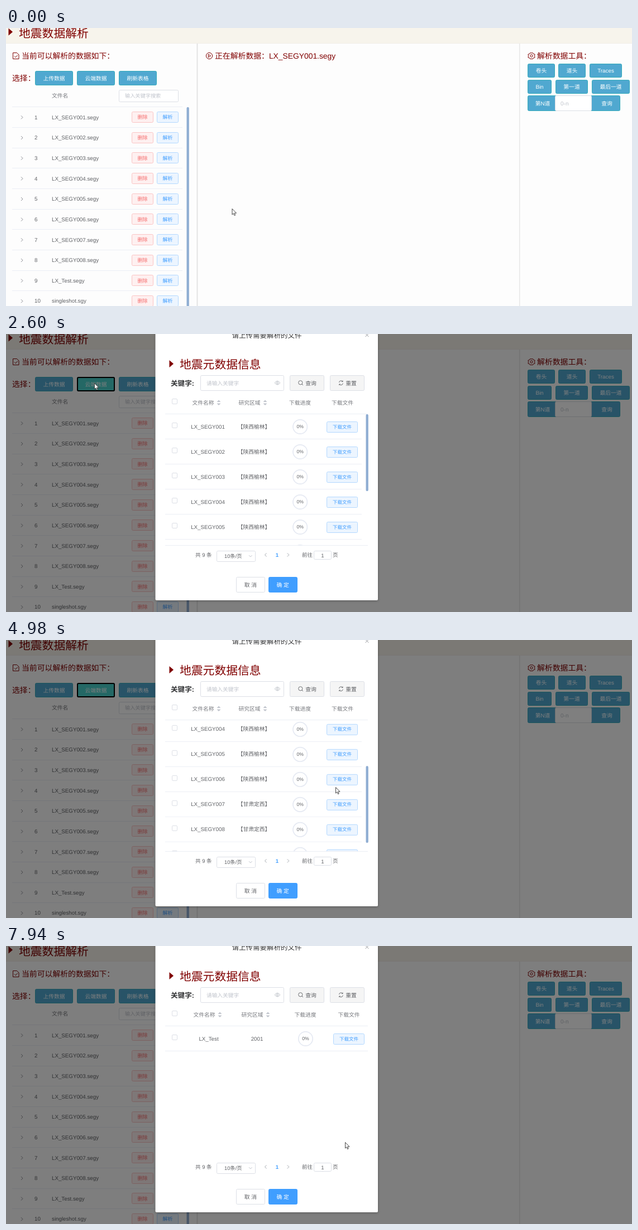
Animation of 1121x499 px, one loop 8000 ms. Source, as an HTML page:

```html
<!DOCTYPE html>
<html lang="zh-CN">
<head>
<meta charset="utf-8">
<title>地震数据解析</title>
<style>
html, body { margin: 0; width: 100%; height: 100%; overflow: hidden; background: #fdfdfd; }
svg { display: block; width: 1121px; height: 499px; }
text {
  font-family: "Liberation Sans", Arial, "Noto Sans CJK SC", "Noto Sans CJK", sans-serif;
  white-space: pre; text-rendering: geometricPrecision;
}
.anim { animation: 8s linear infinite; }
.step { animation: 8s step-end infinite; }

#cloudHover { animation-name: cloudHover; }
#focus { animation-name: focus; }
#shade { animation-name: shade; }
#dialog { animation-name: dialog; filter: drop-shadow(0 1px 2px rgba(0,0,0,.3)); }
#full { animation-name: full; }
#found { animation-name: found; }
#scroll { animation-name: scroll; }
#thumb { animation-name: thumb; }
#cursor { animation-name: cursor; }
#arrow { animation-name: arrow; }
#hand { animation-name: hand; }

.hover { opacity: 0; }
.flash { animation-name: flash; }
#bg1 { animation-name: bg1; }
#bg7 { animation-name: bg7; }
#bg8 { animation-name: bg8; }
#bg9 { animation-name: bg9; }
#on1 { animation-name: on1; }
#on7 { animation-name: bg7; }
#on9 { animation-name: on9; }

@keyframes flash { 0% { opacity: 0 } .5%, 1.6% { opacity: 1 } 3.2%, 100% { opacity: 0 } }
@keyframes bg1 { 0%, 45% { opacity: 0 } 47%, 55% { opacity: 1 } 57%, 100% { opacity: 0 } }
@keyframes bg7 { 0%, 63.8% { opacity: 0 } 64.5%, 67% { opacity: 1 } 68.2%, 100% { opacity: 0 } }
@keyframes bg8 { 0%, 68% { opacity: 0 } 69.5%, 72.5% { opacity: 1 } 74.6%, 100% { opacity: 0 } }
@keyframes bg9 { 0%, 72.6% { opacity: 0 } 73.8%, 100% { opacity: 1 } }
@keyframes on1 { 0%, 52% { opacity: 0 } 53%, 54.8% { opacity: 1 } 55.6%, 100% { opacity: 0 } }
@keyframes on9 { 0%, 74% { opacity: 0 } 75.5%, 100% { opacity: 1 } }

@keyframes cloudHover { 0% { opacity: 0 } 19.875% { opacity: 1 } 77.625%, 100% { opacity: 0 } }
@keyframes focus {
  0% { opacity: 0; stroke: #a9b5b5 }
  31.75% { opacity: 1; stroke: #a9b5b5 }
  32.5% { opacity: 1; stroke: #000 }
  77.625%, 100% { opacity: 0; stroke: #000 }
}
@keyframes shade { 0% { opacity: 0 } 31.75% { opacity: .03 } 32.5%, 100% { opacity: .5 } }
@keyframes dialog { 0% { visibility: hidden } 31.75%, 100% { visibility: visible } }
@keyframes full { 0% { opacity: 1 } 99.25%, 100% { opacity: 0 } }
@keyframes found { 0% { opacity: 0 } 99.25%, 100% { opacity: 1 } }
@keyframes scroll {
  0%, 58% { transform: translateY(0) }
  62.25% { transform: translateY(-141px) }
  64.25%, 100% { transform: translateY(-169px) }
}
@keyframes thumb {
  0%, 58% { transform: translateY(0) }
  62.25% { transform: translateY(82px) }
  64.25%, 100% { transform: translateY(98.5px) }
}
@keyframes cursor {
  0%, 1.6% { transform: translate(404.5px, 324px) }
  3.5%, 9.2% { transform: translate(394px, 315px) }
  19.875% { transform: translate(163px, 94px) }
  20.875%, 25% { transform: translate(155px, 87px) }
  26% { transform: translate(156px, 82px) }
  27.75% { transform: translate(158px, 88px) }
  34.5% { transform: translate(158px, 88px); animation-timing-function: cubic-bezier(.4,.1,.6,.9) }
  45%, 45.3% { transform: translate(521px, 157px) }
  48% { transform: translate(500px, 150px) }
  51% { transform: translate(545px, 154px) }
  53% { transform: translate(584px, 164px) }
  54.625% { transform: translate(588px, 178px) }
  55.625% { transform: translate(590px, 212px) }
  57.5%, 65.6% { transform: translate(590px, 264px) }
  71% { transform: translate(600px, 310px) }
  73% { transform: translate(606px, 337px) }
  73.875% { transform: translate(608px, 349px) }
  75.75%, 100% { transform: translate(607px, 352px) }
}
@keyframes hand {
  0% { opacity: 0 } 19.875% { opacity: 1 } 31.75% { opacity: 0 }
  52.5% { opacity: 1 } 54.4% { opacity: 0 }
  64.25% { opacity: 1 } 67.2% { opacity: 0 }
  70.2% { opacity: 1 } 71.9% { opacity: 0 }
  73.5% { opacity: 1 } 99.25%, 100% { opacity: 0 }
}
@keyframes arrow {
  0% { opacity: 1 } 19.875% { opacity: 0 } 31.75% { opacity: 1 }
  52.5% { opacity: 0 } 54.4% { opacity: 1 }
  64.25% { opacity: 0 } 67.2% { opacity: 1 }
  70.2% { opacity: 0 } 71.9% { opacity: 1 }
  73.5% { opacity: 0 } 99.25%, 100% { opacity: 1 }
}
</style>
</head>
<body>
<script>
const MAROON = '#800000', GREY = '#606266', HEAD = '#77797e', PALE = '#c0c4cc',
      LINE = '#ebeef5', EDGE = '#dcdfe6', BLUE = '#409eff';

// y is the vertical middle of the text
const text = (x, y, size, str, fill = GREY, anchor = 'start', more = '') =>
  `<text x="${x}" y="${y + size * .37}" font-size="${size}" fill="${fill}" text-anchor="${anchor}" ${more}>${str}</text>`;
const mid = (x, y, size, str, fill, more) => text(x, y, size, str, fill, 'middle', more);
const rect = (x, y, w, h, fill, more = '') =>
  `<rect x="${x}" y="${y}" width="${w}" height="${h}" fill="${fill}" ${more}/>`;
// bordered box on whole pixels
const box = (x, y, w, h, fill, stroke, r = 2) =>
  rect(Math.round(x) + .5, Math.round(y) + .5, w - 1, h - 1, fill, `stroke="${stroke}" rx="${r}"`);
const path = (d, stroke, width = 1, fill = 'none') =>
  `<path d="${d}" stroke="${stroke}" stroke-width="${width}" fill="${fill}"/>`;
const hline = (x1, x2, y) => rect(x1, y, x2 - x1, 1, LINE);
const ring = (x, y, r, stroke, width = 1) =>
  `<circle cx="${x}" cy="${y}" r="${r}" fill="none" stroke="${stroke}" stroke-width="${width}"/>`;
const button = (x, y, w, h, str, size, fill, stroke, color) =>
  box(x, y, w, h, fill, stroke) + mid(x + w / 2, y + h / 2, size, str, color);
const tool = (x, y, w, str, h = 25) => button(x, y, w, h, str, 9.8, '#50a8d0', '#34abba', '#fff');
const triangle = (x, y) => path(`M${x} ${y}l7.5 6.5-7.5 6.5z`, 'none', 0, MAROON);

function leftRow(i) {
  const y = 160 + i * 36.65;
  const name = ['LX_Test.segy', 'singleshot.sgy'][i - 8] || `LX_SEGY00${i + 1}.segy`;
  const hover = i < 3
    ? rect(11, y - 18, 305, 36, '#f5f7fa', `class="hover anim flash" style="animation-delay:${1.26 - i * .12}s"`) : '';
  return hover + path(`M27 ${y - 2.6}l3 3-3 3`, '#808389', .9) +
    text(51, y, 9.75, i + 1) + text(82, y, 9.75, name) +
    button(225, y - 10, 39, 20, '删除', 9, '#fef0f0', '#fbc4c4', '#f56c6c') +
    button(270, y - 10, 39, 20, '解析', 9, '#ecf5ff', '#b3d8ff', BLUE) +
    hline(11, 316, Math.round(y + 18));
}

function page() {
  const rows = [...Array(10).keys()].map(leftRow).join('');
  return rect(0, 0, 1121, 499, '#fdfdfd') +
    rect(0, 0, 1121, 28, '#f7f4ec') + rect(0, 27, 1121, 1, '#f1eee7') +
    rect(341, 28, 1, 471, '#f1f1f1') + rect(342, 28, 1, 471, '#e2e2e2') + rect(343, 28, 1, 471, '#f3f3f3') +
    rect(919, 28, 1, 471, '#e6e6e6') + rect(920, 28, 1, 471, '#f4f4f4') +
    triangle(4.5, .5) + text(23, 9, 20.8, '地震数据解析', MAROON) +
    path('M12.5 44.5h7l3.5 3.5v7.5h-10.5zM15 50.5l2.2 2.2 3.6-4', MAROON) +
    text(28, 50, 13.85, '当前可以解析的数据如下：', MAROON) +
    ring(364, 50, 5.6, MAROON) + path('M362.3 47.2l4.2 2.8-4.2 2.8z', MAROON) +
    text(374, 50, 13.85, '正在解析数据：LX_SEGY001.segy', MAROON) +
    path('M938.3 44.8h5.4l1 1.9 2.2.4v2l-.9 1 .9 1v2l-2.2.4-1 1.9h-5.4l-1-1.9-2.2-.4v-2l.9-1-.9-1v-2l2.2-.4z', MAROON) +
    ring(941, 50, 2.2, MAROON) +
    text(951, 50, 13.85, '解析数据工具：', MAROON) +
    text(11, 89.5, 13.85, '选择：', MAROON) +
    tool(52, 77, 68, '上传数据', 26) + tool(127, 77, 68, '云端数据', 26) + tool(202, 77, 68, '刷新表格', 26) +
    `<g id="cloudHover" class="step">${button(127, 77, 68, 26, '云端数据', 9.8, '#48d1cc', '#48d1cc', '#fff')}</g>` +
    rect(128, 78, 66, 24, 'none', 'id="focus" class="step" stroke-width="2" rx="2"') +
    text(82, 121.5, 9.75, '文件名', HEAD, 'start', 'font-weight="500"') +
    box(202, 111, 107, 22, '#fff', EDGE) + text(213, 122, 9.2, '输入关键字搜索', PALE) +
    hline(11, 316, 141) + rows +
    rect(323.5, 142, 4.3, 370, '#8fadd2', 'rx="2.1"') +
    tool(934, 64, 49, '卷头') + tool(989, 64, 49, '道头') + tool(1045, 64, 58, 'Traces') +
    tool(934, 93, 43, 'Bin') + tool(984, 93, 58, '第一道') + tool(1049, 93, 68, '最后一道') +
    tool(934, 121, 54, '第N道', 28) + tool(1046, 121, 54, '', 28) + mid(1076, 135, 9.8, '查询', '#fff') +
    box(983, 121, 66, 28, '#fff', EDGE) + text(993, 135, 10, '0-n', PALE);
}

const check = (x, y) => box(x - 5, y - 5, 10, 10, '#fff', EDGE, 1.5);
const sorter = x => path(`M${x - 3.5} 122l3.5-3.6 3.5 3.6zM${x - 3.5} 124.5l3.5 3.6 3.5-3.6z`, 'none', 0, PALE);

function tableHead(name, area, bar, file) {
  const label = (x, str) => mid(x, 123, 9.75, str, HEAD, 'font-weight="500"');
  return label(name, '文件名称') + sorter(name + 28) + label(area, '研究区域') + sorter(area + 28) +
    label(bar, '下载进度') + label(file, '下载文件') + hline(285, 648, 143);
}

const load = (x, y, on) => on
  ? button(x, y, 56, 20, '下载文件', 8.5, BLUE, BLUE, '#fff')
  : button(x, y, 56, 20, '下载文件', 8.5, '#ecf5ff', '#b3d8ff', BLUE);

const cells = (y, name, area, x1, x2, x3, x4) =>
  check(302, y - 2) + mid(x1, y, 9.75, name) + mid(x2, y, 9.75, area) +
  ring(x3, y + .5, 12.7, '#e5e9f2', 1.7) + mid(x3, y, 8.6, '0%') + load(x4, y - 9.5);

function fileRow(i) {
  const n = i + 1, y = 166 + i * 45;
  const name = n > 8 ? 'LX_Test' : `LX_SEGY00${n}`;
  const area = n > 8 ? '2001' : n > 6 ? '【甘肃定西】' : '【陕西榆林】';
  const bg = [1, 7, 8, 9].includes(n) ? rect(285, y - 22, 352, 45, '#f5f7fa', `id="bg${n}" class="hover anim"`) : '';
  const delay = { 2: 4.43, 8: 5.62 }[n];
  const on = delay ? `<g class="hover anim flash" style="animation-delay:${delay}s">${load(574, y - 9.5, true)}</g>`
    : [1, 7, 9].includes(n) ? `<g id="on${n}" class="hover anim">${load(574, y - 9.5, true)}</g>` : '';
  return bg + cells(y, name, area, 361.5, 444, 526.7, 574) + on + hline(285, 637, y + 22);
}

function dialog() {
  const rows = [...Array(9).keys()].map(fileRow).join('');
  return rect(267.5, -12, 398.5, 490, '#fff', 'rx="2"') +
    mid(467, 2.5, 12.5, '请上传需要解析的文件', '#303133') +
    path('M643.5-1l6 6m0-6l-6 6', '#909399', .9) +
    triangle(292.5, 47) + text(311, 54, 20.8, '地震元数据信息', MAROON) +
    text(295, 88, 12.6, '关键字:', '#303133', 'start', 'font-weight="700"') +
    box(348, 74, 150, 28, '#fff', EDGE) + text(359, 88, 9.7, '请输入关键字', PALE) +
    path('M481.3 87.7q4.7-6.6 9.4 0q-4.7 6.6-9.4 0z', '#b4b8c0', .9) + ring(486, 87.7, 1.6, '#b4b8c0', .9) +
    box(508, 74, 62, 28, '#f5f5f5', EDGE) + ring(527.3, 87.3, 3.6, GREY, .9) + path('M530 90l2 2', GREY, .9) +
    mid(546, 88, 9.8, '查询') +
    box(580, 74, 62, 28, '#f5f5f5', EDGE) +
    path('M596.4 87q.6-3.2 3.6-3.2 2 0 3 1.7v-2m0 2h-2M603.4 88.5q-.6 3.2-3.6 3.2-2 0-3-1.7v2m0-2h2', GREY, .9) +
    mid(618, 88, 9.8, '重置') + check(302, 121) +
    `<g id="full" class="step">${tableHead(353, 436, 526.5, 602.5)}
      <g clip-path="url(#view)"><g id="scroll" class="anim">${rows}</g></g>
      ${rect(644.5, 144, 4.3, 138, '#8fadd2', 'id="thumb" class="anim" rx="2.1"')}
      ${hline(285, 648, 379)}</g>` +
    `<g id="found" class="step">${tableHead(355, 441, 536, 614)}
      ${cells(166, 'LX_Test', '2001', 363, 449.5, 536.5, 586)}${hline(285, 648, 188)}</g>` +
    text(339, 396.5, 9.5, '共 9 条') +
    box(377, 389, 70, 20, '#fff', EDGE) + text(391, 398.5, 9.3, '10条/页') +
    path('M435 397.2l2.8 2.8 2.8-2.8', PALE) +
    path('M466.5 393.5l-3 3 3 3M503.8 393.5l3 3-3 3', '#a0a4ab') +
    mid(485.3, 396.5, 9.5, '1', BLUE, 'font-weight="700"') +
    text(530, 396.5, 9.5, '前往') + box(551, 389, 32, 16, '#fff', EDGE) + mid(567, 397, 9.5, '1') +
    text(585, 396.5, 9.5, '页') +
    button(412, 436, 52, 28, '取 消', 9.8, '#fff', EDGE, GREY) +
    box(470, 436, 52, 28, BLUE, BLUE) + mid(495.7, 450, 9.8, '确 定', '#fff', 'font-weight="500"');
}

const cursor = `<g id="cursor" class="anim">
  <g id="arrow" class="step">${path('M.5.5V11l2.4-2.2 1.6 3.8 1.7-.7L4.6 8.2H8z', '#333', .9, '#fff')}</g>
  <g id="hand" class="step">${path('M-1.2 9V1.5a1.3 1.3 0 0 1 2.6 0V6l4.6 1.1q1.6.5 1.5 2.2l-.6 3.7-1.2 2.6H.4L-4 10.4q-.2-1.7 1.3-1.5z', '#222', 1, '#fff')}</g>
</g>`;

document.body.innerHTML = `<svg xmlns="http://www.w3.org/2000/svg" width="1121" height="499">
  <defs><clipPath id="view"><rect x="285" y="144" width="353" height="235.5"/></clipPath></defs>
  ${page()}
  ${rect(0, 0, 1121, 499, '#000', 'id="shade" class="step"')}
  <g id="dialog" class="step">${dialog()}</g>
  ${cursor}
</svg>`;
</script>
</body>
</html>
```
